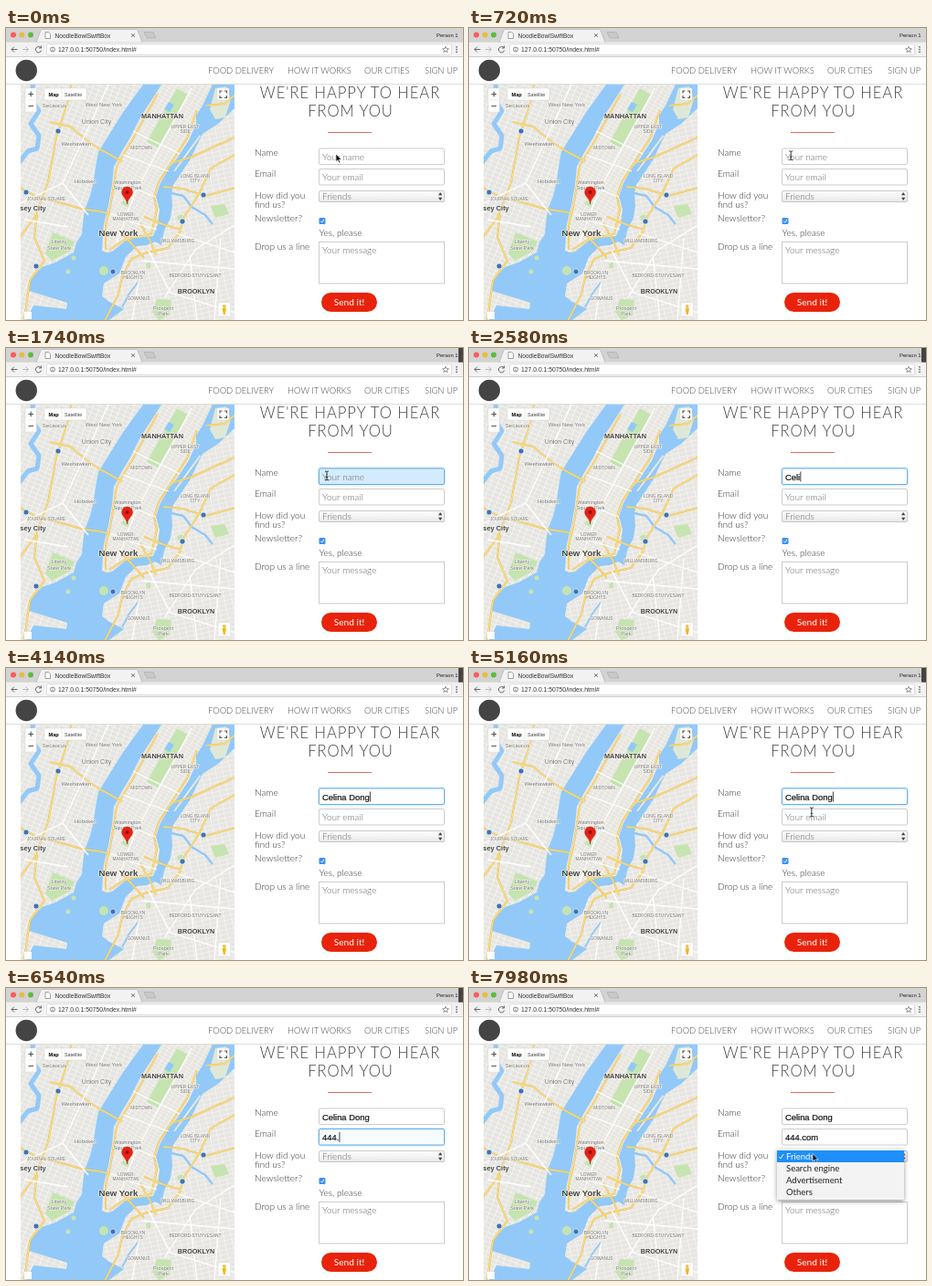
An HTML page that plays this animation: 500 by 320 pixels, repeating every 8 s.

```html
<!DOCTYPE html>
<html lang="en">
<head>
<meta charset="utf-8">
<title>Contact form</title>
<style>
  html, body { margin: 0; width: 100%; height: 100%; overflow: hidden; background: #fff; }
  svg { display: block; width: 500px; height: 320px; }
  text { font-family: "Liberation Sans", Arial, sans-serif; white-space: pre; }
  .lato text, text.lato { font-family: Lato, sans-serif; font-weight: 300; }
  .nav { font-size: 9.4px; fill: #444; }
  .title { font-size: 16.6px; letter-spacing: .95px; fill: #444; text-anchor: middle; }
  .label { font-size: 10.1px; fill: #333; }
  .hint { font-size: 10.1px; fill: #666; }
  .typed { font-size: 9.4px; fill: #111; stroke: #111; stroke-width: .2px; }
  .field { fill: #fff; stroke: #ccc; }
  #menu text { font-size: 9.5px; font-weight: 400; fill: #222; }
  #labels text { text-anchor: middle; fill: #777; stroke: #f4f3ef; stroke-width: 1.2px; paint-order: stroke; }
  #labels .big { fill: #444; font-weight: bold; }
</style>
</head>
<body>
<svg viewBox="0 0 500 320">
  <defs>
    <clipPath id="mapClip"><rect x="16" y="62" width="234" height="258"/></clipPath>
    <pattern id="westGrid" width="7" height="5" patternUnits="userSpaceOnUse" patternTransform="rotate(22)">
      <rect width="7" height="5" fill="#e6e5e1"/><path d="M0 0H7M0 0V5" stroke="#fbfbf9" stroke-width="1.1"/>
    </pattern>
    <pattern id="cityGrid" width="6" height="4" patternUnits="userSpaceOnUse" patternTransform="rotate(31)">
      <rect width="6" height="4" fill="#e7e5df"/><path d="M0 0H6M0 0V4" stroke="#fbfaf6" stroke-width="1"/>
    </pattern>
    <pattern id="eastGrid" width="8" height="5" patternUnits="userSpaceOnUse" patternTransform="rotate(-12)">
      <rect width="8" height="5" fill="#e7e6e2"/><path d="M0 0H8M0 0V5" stroke="#fbfbf9" stroke-width="1"/>
    </pattern>
    <linearGradient id="selectFill" x2="0" y2="1"><stop stop-color="#fff"/><stop offset="1" stop-color="#e8e8e8"/></linearGradient>
    <filter id="shadow" x="-20%" y="-20%" width="140%" height="150%"><feDropShadow dx="0" dy="2" stdDeviation="2.5" flood-opacity=".4"/></filter>
    <filter id="glow" x="-10%" y="-50%" width="120%" height="200%"><feDropShadow dx="0" dy="0" stdDeviation="1.2" flood-color="#66afe9" flood-opacity=".7"/></filter>
  </defs>
  <rect width="500" height="320" fill="#fff"/>

  <!-- browser -->
  <rect width="500" height="16" fill="#d3d3d3"/>
  <circle cx="8" cy="7.5" r="3" fill="#fc5b57"/><circle cx="17.5" cy="7.5" r="3" fill="#e5bf3c"/><circle cx="27" cy="7.5" r="3" fill="#57c038"/>
  <path d="M33 16L38 2.5Q38.5 1.5 40 1.5H142Q143.500 1.500 144 2.500L149 16Z" fill="#f2f2f2" stroke="#aaa" stroke-width=".6"/>
  <path d="M151 4.500H161L164 11H154Z" fill="#c8c8c8" stroke="#aaa" stroke-width=".6"/>
  <path d="M43 4.500H46.500L48.500 6.500V11.500H43Z" fill="#fff" stroke="#777" stroke-width=".7"/>
  <text x="53.500" y="10.500" font-size="6.6" fill="#333">NoodleBowlSwiftBox</text>
  <path d="M137 6L141 10M141 6L137 10" stroke="#666" stroke-width=".8"/>
  <text x="471" y="9.500" font-size="5.9" fill="#222">Person 1</text>
  <rect id="corner" x="495" width="5" height="16" fill="#444"/>
  <rect y="15.700" width="500" height="16" fill="#f2f2f2"/>
  <rect x="44.500" y="17.500" width="443" height="12" rx="1.500" fill="#fff" stroke="#ccc" stroke-width=".6"/>
  <g fill="none" stroke="#666">
    <path d="M12.500 23.500H6M9 20.500L6 23.500L9 26.500"/>
    <path d="M18 23.500H24.500M21.500 20.500L24.500 23.500L21.500 26.500" stroke="#bbb"/>
    <path d="M38 21.500A3.200 3.200 0 1 0 38.700 24.500M38.500 19.500V22H36"/>
    <circle cx="51" cy="23.500" r="2.500" stroke-width=".8"/><path d="M51 23V25M51 21.800V22.400" stroke-width=".7"/>
    <path d="M481 20.300L482 22.600L484.400 22.800L482.500 24.300L483.100 26.600L481 25.300L478.900 26.600L479.500 24.300L477.600 22.800L480 22.600Z" stroke-width=".7"/>
    <path d="M493 20V27" stroke-width="1.500" stroke-dasharray="1.500 1.250"/>
  </g>
  <text x="57" y="26" font-size="6.8" fill="#333">127.0.0.1:50750/index.html#</text>
  <path d="M0 31.500H500" stroke="#bbb" stroke-width=".7"/>

  <!-- site header -->
  <circle cx="22.300" cy="46.500" r="11.700" fill="#444"/>
  <g class="lato nav">
    <text x="221" y="50">FOOD DELIVERY</text><text x="308" y="50">HOW IT WORKS</text>
    <text x="392" y="50">OUR CITIES</text><text x="458" y="50">SIGN UP</text>
  </g>
  <path d="M0 61.500H500" stroke="#ddd"/>

  <!-- map -->
  <g clip-path="url(#mapClip)">
    <rect x="16" y="62" width="234" height="258" fill="#92c9f8"/>
    <path fill="url(#westGrid)" d="M0 50H160L150 62L129 91L112 118L101 136L98 152L96 168L92 184L86 199L84 215L83 226L77 235L74 246L54 257L39 262L27 276L25 288L67 301L66 308L30 304L22 320H0Z"/>
    <path fill="url(#cityGrid)" d="M180 50L170 62L163 73L147 98L136 120L127 135L118 152L116 172L112 195L107 215L105 244L110 246L116 245L131 233L142 230L161 228L166 215L168 199L164 184L169 170L178 154L187 143L200 123L208 105V96L215 85L225 64L230 50Z"/>
    <path fill="url(#eastGrid)" d="M260 82L249 89L232 105L215 116L201 145L183 172L181 181L182 195L180 208L173 222L170 238L163 234L154 238L143 239L131 251L124 269L107 280L105 294L113 300L129 308L109 323H260Z"/>
    <path fill="#dfe8d5" d="M229 66L241 64L246 78L240 98L229 100L223 89Z"/>
    <path fill="url(#cityGrid)" d="M212 117L213 119L185 157L183 157Z"/>
    <g fill="#c5e4b0">
      <path d="M154 125L166 131L199 73L187 66Z"/>
      <path d="M51 224L75 234L71 244L50 255L43 247Z"/>
      <path d="M165 297L181 298L179 315L167 320L160 311Z"/>
      <circle cx="107" cy="266" r="5"/><circle cx="74" cy="252" r="2.500"/><circle cx="68" cy="267" r="2.500"/>
      <path d="M128 189L135 192L133 196L126 193ZM187 206L193 204L194 210L188 211ZM153 258L158 257V263L154 264ZM224 195L239 193L244 204L229 208Z"/>
    </g>
    <path d="M178 81L184 84L179 92L173 89Z" fill="#92c9f8"/>
    <g fill="none" stroke="#92c9f8" stroke-linejoin="round">
      <path d="M14 148L24 135L34 132L36 118L27 105L36 91L27 76L30 60" stroke-width="5"/>
      <path d="M181 181L194 184L203 196L218 205L226 215" stroke-width="2.500"/>
      <path d="M127 306L135 291L145 278" stroke-width="2"/>
    </g>
    <g fill="none" stroke="#e9bd4e" stroke-width="2">
      <g id="roads">
        <path d="M14 231L31 208L46 169L55 120L67 82L72 60"/>
        <path d="M48 103L70 108L87 122L101 132L127 146"/>
        <path d="M14 174L32 184L54 190L82 198L114 203"/>
        <path d="M34 204L31 229L42 255L26 277L20 320"/>
        <path d="M252 138L224 154L211 182L195 207L190 224L177 241L154 246L137 253L127 273L123 292L107 323"/>
        <path d="M172 174L193 176L218 184L252 175"/>
        <path d="M109 243L109 216L114 196L118 172L121 151L139 121L166 72"/>
        <path d="M113 243L132 231L159 226L165 199L162 185L167 169L198 121L209 90"/>
        <path d="M126 225L137 236L151 252M147 214L158 234L164 249M151 207L174 216L192 221"/>
        <path d="M181 148L204 141L252 119M219 85L239 83L252 72"/>
      </g>
    </g>
    <use href="#roads" fill="none" stroke="#fbe08b" stroke-width="1.100" style="stroke:#fbe08b"/>
    <g fill="none" stroke="#fff" stroke-width="1.300">
      <path d="M121 235L141 181L203 66M114 203L139 213L165 221M119 168L164 185M128 139L178 157M139 113L190 138"/>
      <path d="M148 255L250 264M156 244L180 290L250 312M186 225L250 246M174 295L207 243L250 216M145 278L138 320M201 250L209 320M235 230L228 320"/>
      <path d="M16 192L62 170L112 62M62 170L90 205M20 210L68 218"/>
    </g>
    <g id="shields" fill="#3f73b8" stroke="#fff" stroke-width=".6"></g>
    <g id="labels"></g>
    <path d="M132.600 193C132 186 126.700 185 126.700 179.800A5.900 5.900 0 0 1 138.500 179.800C138.500 185 133.200 186 132.600 193Z" fill="#ea2012" stroke="#a61408" stroke-width=".5"/>
    <circle cx="132.600" cy="180" r="2" fill="#8b0f05"/>
    <g fill="#fff" stroke="#ccc" stroke-width=".4">
      <rect x="21" y="66" width="12.500" height="26" rx="1"/><rect x="42" y="66" width="46" height="13" rx="1"/>
      <rect x="231" y="66" width="13" height="13" rx="1"/><rect x="232" y="301" width="13.500" height="15" rx="1"/>
      <path d="M23 79H31.500M61 66V79"/>
    </g>
    <path d="M24.500 72.500H30M27.250 69.750V75.250M24.500 85.500H30M234 71.500V69H236.500M239 69H241.500V71.500M241.500 74V76.500H239M236.500 76.500H234V74" fill="none" stroke="#555" stroke-width="1.200"/>
    <text x="46.500" y="75" font-size="5.600" font-weight="bold">Map</text>
    <text x="64" y="75" font-size="5.400" fill="#444">Satellite</text>
    <circle cx="238.800" cy="305" r="1.800" fill="#f4b81e"/><path d="M236.500 307H241L240.400 311L239.800 314H237.800L237.200 311Z" fill="#f4b81e"/>
    <rect x="20" y="311" width="8" height="8" fill="#fff"/>
  </g>

  <!-- form -->
  <g class="lato">
    <g class="title"><text x="376.500" y="77">WE'RE HAPPY TO HEAR</text><text x="377" y="97">FROM YOU</text></g>
    <path d="M352 114.500H400" stroke="#ea6a58" stroke-width="1.200"/>
    <g class="label">
      <text x="272" y="140">Name</text><text x="272" y="163">Email</text><text x="272" y="186.500">How did you</text>
      <text x="272" y="196.500">find us?</text><text x="272" y="212">Newsletter?</text><text x="272" y="242.500">Drop us a line</text>
      <text x="342.500" y="228">Yes, please</text>
    </g>
    <rect id="nameBox" class="field" x="342.500" y="132" width="137" height="17.500" rx="1.500"/>
    <rect id="emailBox" class="field" x="342.500" y="154.500" width="137" height="17.500" rx="1.500"/>
    <rect x="342.500" y="178.500" width="137" height="12" rx="1.500" fill="url(#selectFill)" stroke="#bbb" stroke-width=".8"/>
    <rect class="field" x="342.500" y="234.500" width="137" height="45.500"/>
    <path d="M473 183.300L475.200 180L477.400 183.300ZM473 185.700L475.200 189L477.400 185.700Z" fill="#444"/>
    <rect x="342.500" y="208" width="7" height="7" rx="1.300" fill="#3a8df6"/>
    <path d="M344.200 211.700L345.700 213.200L348 209.700" fill="none" stroke="#fff"/>
    <g class="hint">
      <text id="nameHint" x="346" y="144.500">Your name</text><text id="emailHint" x="346" y="167">Your email</text>
      <text x="346" y="188">Friends</text><text x="346" y="247">Your message</text>
    </g>
    <rect x="345" y="290" width="61" height="21" rx="10.500" fill="#e8230a"/>
    <text x="375.500" y="304" font-size="10.200" text-anchor="middle" fill="#fff" style="font-weight:400">Send it!</text>
  </g>
  <text id="nameText" class="typed" x="346" y="144.500"></text>
  <text id="emailText" class="typed" x="346" y="167"></text>
  <rect id="caret" width=".8" height="11" fill="#111"/>

  <g id="menu" class="lato">
    <path d="M337 176H476V230Q476 232 474 232H339Q337 232 337 230Z" fill="#f3f3f3" filter="url(#shadow)"/>
    <rect x="337" y="178" width="139" height="13" fill="#1e8ffb"/>
    <path d="M339.500 185L341 187L344 182" fill="none" stroke="#fff" stroke-width=".9"/>
    <text x="347" y="188" style="fill:#fff">Friends</text><text x="347" y="201">Search engine</text>
    <text x="347" y="214">Advertisement</text><text x="347" y="227">Others</text>
  </g>
  <path id="arrow" d="M0 0V8.500L2 6.700L3.400 9.800L4.800 9.200L3.400 6.200H6Z" fill="#111" stroke="#fff" stroke-width=".6"/>
  <path id="beam" d="M-2 -5Q0 -5 0 -4Q0 -5 2 -5M0 -4V4M-2 5Q0 5 0 4Q0 5 2 5M-1 1.500H1" fill="none" stroke="#222" stroke-width=".9"/>
</svg>
<script>
const el = id => document.getElementById(id);
const show = (id, on) => el(id).style.display = on ? "" : "none";
const clamp = v => Math.max(0, Math.min(1, v));

function addSvg(parent, tag, attrs, text = "") {
  const node = document.createElementNS("http://www.w3.org/2000/svg", tag);
  for (const key in attrs) node.setAttribute(key, attrs[key]);
  node.textContent = text;
  el(parent).append(node);
}

const bigLabels = [
  ["MANHATTAN", 171, 99, 7.4], ["New York", 123, 228, 9.6],
  ["BROOKLYN", 208, 291, 7.2], ["Jersey City", 24, 200, 7.4]
];
const smallLabels = [
  ["Secaucus", 53, 87], ["Union City", 99, 105, 7], ["Weehawken", 77, 129], ["Hoboken", 87, 170],
  ["West New York", 107, 86], ["JOURNAL SQUARE", 44, 189, 4.6], ["UPPER EAST", 196, 110, 4.8],
  ["SIDE", 196, 115, 4.8], ["MIDTOWN", 148, 133, 4.8], ["Washington", 133, 171, 5.6],
  ["Square Park", 133, 177, 5.6], ["LOWER", 131, 206, 4.8], ["MANHATTAN", 131, 211, 4.8],
  ["LONG ISLAND", 207, 164, 4.8], ["CITY", 207, 169, 4.8], ["WILLIAMSBURG", 188, 235, 4.8],
  ["Liberty", 58, 236, 5.6], ["State Park", 58, 243, 5.6], ["BROOKLYN", 139, 270, 4.8],
  ["HEIGHTS", 139, 275, 4.8], ["BEDFORD-STUYVESANT", 207, 273, 4.8], ["GOWANUS", 145, 298, 4.8],
  ["Prospect", 172, 309, 5.6], ["Park", 172, 315, 5.6]
];
const addLabel = cls => ([text, x, y, size = 6]) =>
  addSvg("labels", "text", { x, y, class: cls, "font-size": size }, text);
smallLabels.forEach(addLabel("small"));
bigLabels.forEach(addLabel("big"));
for (const [cx, cy] of [[22, 180], [57, 113], [117, 267], [33, 261], [216, 183], [193, 212]])
  addSvg("shields", "circle", { cx, cy, r: 3 });

const LOOP = 8000, MENU_OPEN = 7650;
const fields = [
  { id: "name", text: "Celina Dong", focus: 1000, start: 1920, step: 220, blur: 5400, top: 135.5 },
  { id: "email", text: "444.com", focus: 5400, start: 5920, step: 200, blur: MENU_OPEN, top: 158 }
];

// Pointer path: [time, x, y], eased between stops.
const stops = [[0, 361, 138], [250, 361, 138], [850, 351, 140], [4400, 351, 140],
               [5200, 375, 158], [7200, 375, 158], [7550, 376, 181.5], [LOOP, 376, 181.5]];
function pointerAt(t) {
  const i = stops.findIndex(s => s[0] > t);
  const [t0, x0, y0] = stops[i - 1], [t1, x1, y1] = stops[i];
  const p = (t - t0) / (t1 - t0), e = p * p * (3 - 2 * p);
  return [x0 + (x1 - x0) * e, y0 + (y1 - y0) * e];
}

function drawField(f, t) {
  const focused = t >= f.focus && t < f.blur;
  const count = Math.max(0, Math.min(f.text.length, Math.floor((t - f.start) / f.step) + 1));
  const box = el(f.id + "Box"), text = el(f.id + "Text");
  text.textContent = f.text.slice(0, count);
  show(f.id + "Hint", !count);

  // The field flashes blue on focus, then fades to white.
  const tint = focused ? 1 - clamp((t - f.focus - 350) / 900) : 0;
  box.style.fill = `rgb(${255 - 78 * tint}, ${255 - 34 * tint}, ${255 - 4 * tint})`;
  box.style.stroke = focused ? "#66afe9" : "#ccc";
  box.style.filter = focused ? "url(#glow)" : "none";
  if (!focused) return;

  const lastEvent = count ? f.start + (count - 1) * f.step : f.focus;
  el("caret").setAttribute("x", 346.3 + (count ? text.getComputedTextLength() : 0));
  el("caret").setAttribute("y", f.top);
  show("caret", (t - lastEvent) % 1000 < 500);
}

function frame(now) {
  const t = now % LOOP;
  show("caret", false);
  fields.forEach(f => drawField(f, t));
  show("menu", t >= MENU_OPEN);
  show("corner", t >= 1400 && t < 7000);

  const place = `translate(${pointerAt(t)})`;
  const typing = (t >= 1920 && t < 4400) || (t >= 5920 && t < 7200);
  const isArrow = t < 500 || t >= 7400;
  el("arrow").setAttribute("transform", place);
  el("beam").setAttribute("transform", place);
  show("arrow", isArrow);
  show("beam", !isArrow && !typing);
  requestAnimationFrame(frame);
}
requestAnimationFrame(frame);
</script>
</body>
</html>
```
